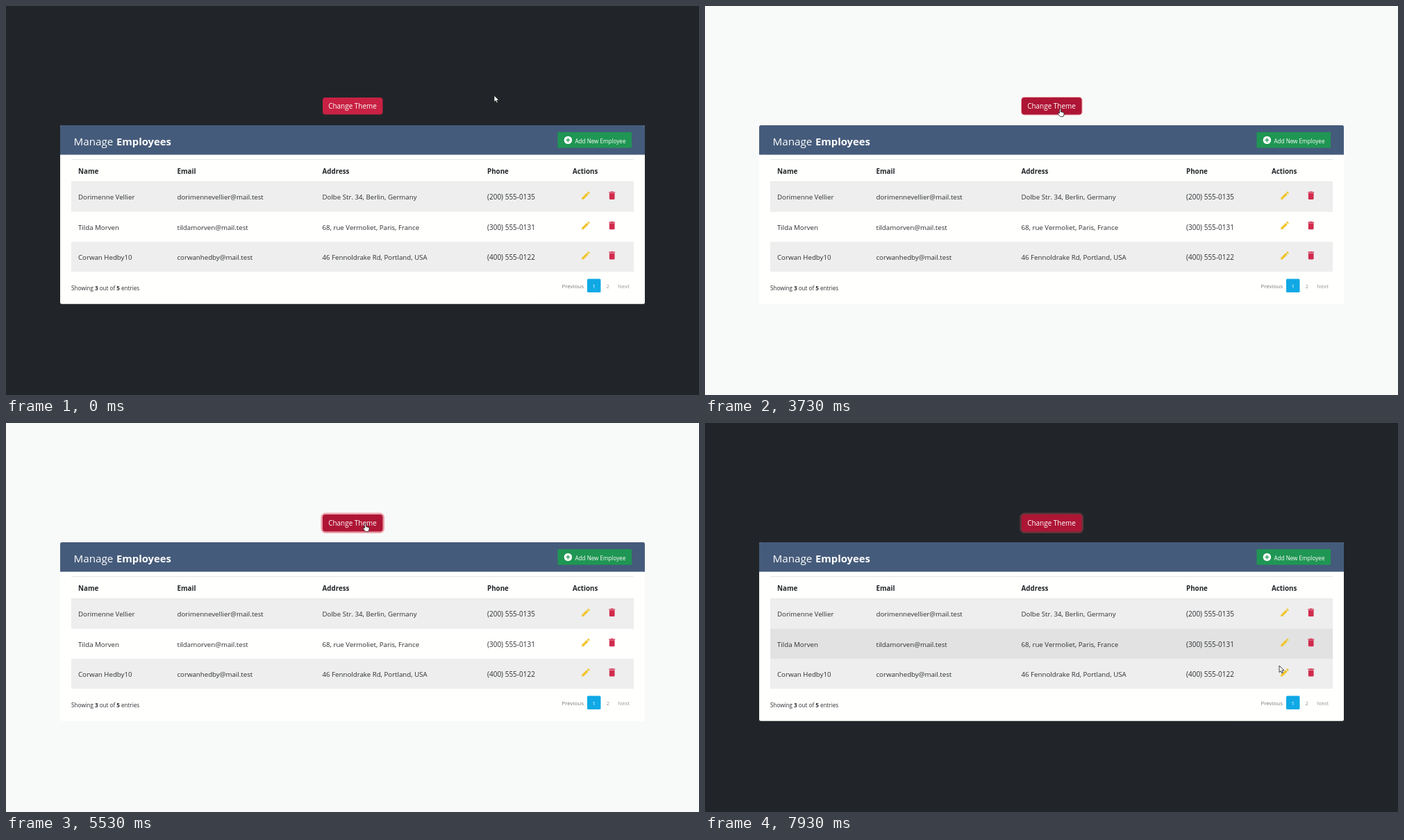
Recreate the animation shown at these times as an HTML page. Size 998 by 561 pixels, loop 8 s.

```html
<!DOCTYPE html>
<html lang="en">
<head>
<meta charset="utf-8">
<title>Employee table</title>
<style>
  html, body { margin: 0; width: 100%; height: 100%; overflow: hidden; background: #212529; }
  svg { display: block; width: 998px; height: 561px; font-family: "Open Sans", "Noto Sans", sans-serif; }
  .title { font-size: 15.2px; font-weight: 500; fill: #fff; }
  .title .strong { font-size: 14.8px; }
  .strong { font-weight: 700; }
  .head { font-size: 9.8px; font-weight: 700; fill: #212529; }
  .cell { font-size: 9.7px; fill: #2c2f32; }
  .phone { font-size: 10px; }
  .small { font-size: 8.1px; fill: #2c3034; }
  .page { font-size: 7.9px; fill: #999; }
  .page .prev { fill: #777; }
  .page .now { fill: #fff; }
  .add { font-size: 8.1px; fill: #fff; }
  .theme { font-size: 9.95px; fill: #fff; text-anchor: middle; }
</style>
</head>
<body>
<svg id="stage" viewBox="0 0 998 561">
  <defs>
    <path id="edit" d="M3 17.25V21h3.75L17.81 9.94l-3.75-3.75L3 17.25zM20.71 7.04a1 1 0 0 0 0-1.41l-2.34-2.34a1 1 0 0 0-1.41 0l-1.83 1.83 3.75 3.75 1.83-1.83z" fill="#f0c52e"/>
    <path id="bin" d="M6 19a2 2 0 0 0 2 2h8a2 2 0 0 0 2-2V7H6v12zM19 4h-3.5l-1-1h-5l-1 1H5v2h14V4z" fill="#d12b4d"/>
  </defs>
  <rect id="back" width="998" height="561" fill="#212529"/>

  <rect id="ring" x="456" y="132" width="86.5" height="24.5" rx="4" fill="none" stroke="#e15361"/>
  <rect id="button" x="456" y="132" width="86.5" height="24.5" rx="4"/>
  <text class="theme" x="499" y="148">Change Theme</text>

  <rect x="78" y="172" width="842" height="257.7" rx="2.5" fill="#fffffd"/>
  <path d="M78 214.5V174.5q0-2.5 2.5-2.5H917.5q2.5 0 2.5 2.5V214.5Z" fill="#455b7b"/>
  <g class="title">
    <text x="97.5" y="201">Manage</text>
    <text class="strong" x="159" y="201">Employees</text>
  </g>
  <rect x="794.5" y="182" width="106.5" height="22.5" rx="1" fill="#1f9653"/>
  <circle cx="809.4" cy="193.4" r="5.7" fill="#fff"/>
  <path d="M806.4 193.4h6M809.4 190.4v6" stroke="#1f9653" stroke-width="1.3"/>
  <text class="add" x="819.5" y="197.5">Add New Employee</text>

  <g id="table"></g>

  <text class="small" x="94" y="410">Showing <tspan class="strong">3</tspan> out of <tspan class="strong">5</tspan> entries</text>
  <rect x="837" y="393.5" width="19.5" height="19.5" rx="1.5" fill="#10a9e5"/>
  <g class="page">
    <text class="prev" x="800.5" y="407">Previous</text>
    <text class="now" x="844.6" y="407">1</text>
    <text x="864.5" y="407">2</text>
    <text x="881" y="407">Next</text>
  </g>

  <g id="pointer" stroke="#16181a" stroke-width=".8" stroke-linejoin="round" fill="#fff">
    <path id="arrow" d="M0 0V9.6L2.2 7.5 3.7 10.8 5.3 10.1 3.9 6.9H7Z"/>
    <path id="hand" transform="translate(-3.5 0)" d="M2.6 6.5V1.2a1 1 0 0 1 2 0V4.6L8 5.4q1.3.3 1.2 1.6L8.7 10q-.2 1.6-1.8 1.6H4.6q-1 0-1.7-.9L.4 7.6q-.5-.9.3-1.3t1.5.6Z"/>
  </g>
</svg>
<script>
  const $ = id => document.getElementById(id);
  const LOOP = 8000, STEP = 1000 / 15;
  const COLS = [104, 246.5, 455.5, 693, 816];
  const HEADS = ["Name", "Email", "Address", "Phone", "Actions"];
  const PEOPLE = [
    ["Dorimenne Vellier", "dorimennevellier@mail.test", "Dolbe Str. 34, Berlin, Germany", "(200) 555-0135"],
    ["Tilda Morven", "tildamorven@mail.test", "68, rue Vermoliet, Paris, France", "(300) 555-0131"],
    ["Corwan Hedby10", "corwanhedby@mail.test", "46 Fennoldrake Rd, Portland, USA", "(400) 555-0122"]
  ];

  const text = (cls, x, y, s) => `<text class="${cls}" x="${x}" y="${y}">${s}</text>`;
  const icon = (id, x, y) =>
    `<use href="#${id}" transform="translate(${x} ${y}) scale(.64) translate(-12 -12)"/>`;
  const line = y => `<path d="M94 ${y}H904" stroke="#dfe2e4" stroke-width=".8"/>`;

  function row(cells, i) {
    const y = 253.7 + i * 43.2;
    return `<rect id="row${i}" x="94" y="${y}" width="810" height="43.2" fill="${i % 2 ? "#fffffd" : "#eeeeee"}"/>`
      + cells.map((s, c) => text(c === 3 ? "cell phone" : "cell", COLS[c], y + 25.6, s)).join("")
      + icon("edit", 835, y + 19.6) + icon("bin", 872.7, y + 19.6);
  }

  $("table").innerHTML = line(221.5)
    + HEADS.map((s, c) => text("head", COLS[c], 241.5, s)).join("")
    + PEOPLE.map(row).join("") + line(253.6);

  // time, x, y of the pointer tip
  const PATH = [
    [0, 703, 129], [1134, 703, 129], [1500, 595, 84], [1760, 712, 112], [2000, 697, 139],
    [2267, 687, 248], [2460, 655, 268], [2867, 556, 149], [3067, 530, 150], [3400, 511.5, 148],
    [5000, 511.5, 148], [5400, 517.5, 145], [7590, 517.5, 145], [7933, 827, 350]
  ];
  const FLIPS = [3730, 4660, 5530, 6460, 7260, 7530];
  const RED = [200, 33, 67], DEEP = [174, 21, 53];

  const clamp = v => Math.max(0, Math.min(1, v));
  const mix = (a, b, k) => a + (b - a) * k;

  function pointAt(t) {
    const n = PATH.findIndex(p => p[0] > t);
    if (n < 0) return PATH[PATH.length - 1].slice(1);
    const a = PATH[n - 1], b = PATH[n];
    const k = (t - a[0]) / (b[0] - a[0]);
    return [mix(a[1], b[1], k), mix(a[2], b[2], k)];
  }

  function draw(time) {
    // hold each 1/15 s step; its start is rounded down to 10 ms
    const t = Math.floor((time % LOOP + 9) / STEP) * STEP;
    const [x, y] = pointAt(t);
    const light = FLIPS.filter(f => f <= t).length % 2 === 1;
    const over = x > 456 && x < 542.5 && y > 132 && y < 156.5;
    const hover = clamp((t - 2930) / 150);
    const focus = clamp((t - 3670) / 150);

    $("back").setAttribute("fill", light ? "#f8faf9" : "#212529");
    $("button").setAttribute("fill", `rgb(${RED.map((c, i) => Math.round(mix(c, DEEP[i], hover)))})`);
    $("ring").setAttribute("stroke-width", 5 * focus);
    $("ring").setAttribute("stroke-opacity", light ? .52 : .34);
    $("row1").setAttribute("fill", t > 7860 ? "#e2e2e2" : "#fffffd");
    $("pointer").setAttribute("transform", `translate(${x} ${y})`);
    $("arrow").style.display = over ? "none" : "";
    $("hand").style.display = over ? "" : "none";
  }

  const start = performance.now();
  function tick() {
    draw(performance.now() - start);
    requestAnimationFrame(tick);
  }
  tick();
</script>
</body>
</html>
```
